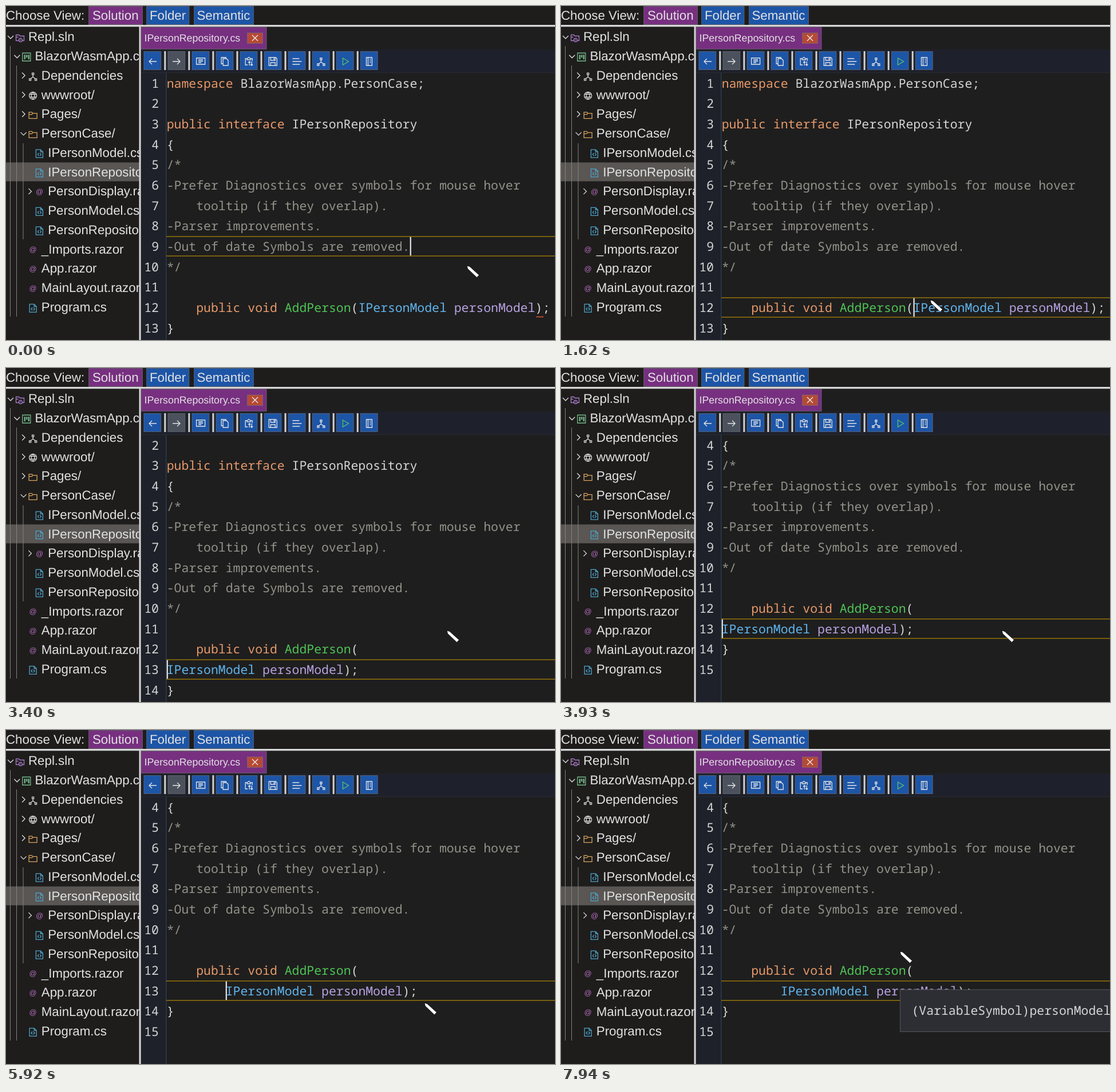
An HTML page that plays this animation: 959 px wide and 584 px high, repeating every 8 s.

```html
<!DOCTYPE html>
<html lang="en">
<head>
<meta charset="utf-8">
<style>
html, body { margin: 0; width: 100%; height: 100%; overflow: hidden; background: #1e1d1c; }
svg { display: block; width: 100%; height: 100%; }
text { font: 22.3px "Liberation Sans", Arial, sans-serif; fill: #e2e2e2; white-space: pre; text-rendering: geometricPrecision; }
.code text { font: 21.46px "Noto Sans Mono", monospace; fill: #d6d6d6; }
.code .num { text-anchor: end; }
.k { fill: #e8996a; }
.c { fill: #93928a; }
.m { fill: #4fc456; }
.t { fill: #60b5ee; }
.p { fill: #b8a2e2; }
.icon { fill: none; stroke-width: 1.3; }
.button { stroke: #777; stroke-opacity: .55; stroke-width: 1.2; }
</style>
</head>
<body>
<svg viewBox="0 0 959 584" preserveAspectRatio="none">
  <clipPath id="side"><path d="M0 36H233V584H0z"/></clipPath>
  <g id="frame"></g>
  <g id="code" class="code"></g>
  <g id="tip" class="code">
    <rect x="592.5" y="454" width="380" height="73.500" fill="#2d2e33" stroke="#55565a"/>
    <text x="612.500" y="498">(VariableSymbol)personModel</text>
  </g>
  <path id="mouse" d="M0 0L5 1.500L21.500 16.500L17.500 20.800L1.500 5.500z" fill="#fff" stroke="#000" stroke-width=".8"/>
</svg>
<script>
const $ = id => document.getElementById(id);
const rect = (x, y, w, h, fill, attr = '') =>
  `<rect x="${x}" y="${y}" width="${w}" height="${h}" fill="${fill}" ${attr}/>`;
const button = (x, y, w, h, fill) => rect(x + .6, y + .6, w - 1.2, h - 1.2, fill, 'class="button"');
const text = (x, y, s, attr = '') => `<text x="${x}" y="${y}" ${attr}>${s}</text>`;
const icon = (x, y, color, d) =>
  `<path class="icon" transform="translate(${x} ${y})" stroke="${color}" d="${d}"/>`;

// Icon outlines, centred on 0,0
const art = {
  down: 'M-5 -2L0 3L5 -2',
  right: 'M-2.500 -5L2.500 0L-2.500 5',
  folder: 'M-7 6V-5H-2L0 -3H7V6zM-7 -1H-2L0 -3',
  root: 'M-2 5H-7V-5H-2L0 -3H7V5H4M-7 -1H-3M-2 4a3 3 0 1 0 6 0a3 3 0 1 0 -6 0M0 4h2',
  project: 'M-7 -7H7V7H-7zM-3.500 -4V4M0 -4V1M3.500 -4V4M-2.500 -4V4M1 -4V1M4.500 -4V4',
  graph: 'M-1.500 -6H1.500V-3H-1.500zM-6.500 4H-3.500V7H-6.500zM3.500 4H6.500V7H3.500zM0 -3V1L-4 4M0 1L4 4',
  globe: 'M-6.500 0a6.500 6.500 0 1 0 13 0a6.500 6.500 0 1 0 -13 0M-6 -2.500H6M-6 2.500H6M0 -6.500Q-6 0 0 6.500Q6 0 0 -6.500',
  file: 'M-6 -7H2L6 -3V7H-6zM2 -7V-3H6M-1 -1L-3 1.500L-1 4M1 -1L3 1.500L1 4',
  left: 'M7 0H-6M-1 -5L-6 0L-1 5',
  forward: 'M-7 0H6M1 -5L6 0L1 5',
  panel: 'M-7.500 -6H7.500V5H-7.500zM-4 -3H4M-4 -.5H4M-4 2H1',
  copy: 'M-3 -5H3L6 -2V7H-3zM-3 4H-6V-7H2V-5',
  paste: 'M-2 6H-6V-5H-3M3 -5H6V-1M-3 -3V-5L0 -7.500L3 -5V-3zM1 7V0M-1 2L1 0L3 2M5 0V7M3 5L5 7L7 5',
  save: 'M-7 -7H5L7 -5V7H-7zM-4 -7V-2H4V-7M-4 7V2H4V7M2 -6V-3',
  lines: 'M-8 -5H4M-8 0H8M-8 5H5',
  play: 'M-4 -6L6 0L-4 6z',
  book: 'M-5 -7H5V7H-5zM-2 -7V7M1 -4H3M1 -1H3M1 2H3'
};

// Tree rows: indent, chevron, icon, colour, label
const tree = [
  [0, 'down', 'root', '#a77bc8', 'Repl.sln'],
  [1, 'down', 'project', '#74b88a', 'BlazorWasmApp.csproj'],
  [2, 'right', 'graph', '#ddd', 'Dependencies'],
  [2, 'right', 'globe', '#ddd', 'wwwroot/'],
  [2, 'right', 'folder', '#d9a35c', 'Pages/'],
  [2, 'down', 'folder', '#d9a35c', 'PersonCase/'],
  [3, '', 'file', '#4ea4cc', 'IPersonModel.cs'],
  [3, '', 'file', '#4ea4cc', 'IPersonRepository.cs'],
  [3, 'right', '@', '#b76ec0', 'PersonDisplay.razor'],
  [3, '', 'file', '#4ea4cc', 'PersonModel.cs'],
  [3, '', 'file', '#4ea4cc', 'PersonRepository.cs'],
  [2, '', '@', '#b76ec0', '_Imports.razor'],
  [2, '', '@', '#b76ec0', 'App.razor'],
  [2, '', '@', '#b76ec0', 'MainLayout.razor'],
  [2, '', 'file', '#4ea4cc', 'Program.cs']
];
const tools = ['left', 'forward', 'panel', 'copy', 'paste', 'save', 'lines', 'graph', 'play', 'book'];
const purple = '#772f80', blue = '#1d55a7';

function drawFrame() {
  let s = button(144, 0, 95, 33, purple) + button(245, 0, 75.5, 33, blue) + button(328, 0, 105, 33, blue);
  s += text(0, 23.7, 'Choose View:') + text(151, 23.7, 'Solution') + text(251, 23.7, 'Folder') + text(333.5, 23.7, 'Semantic');

  s += '<g clip-path="url(#side)">' + rect(0, 273.5, 233, 33, '#595654');
  s += '<path d="M7.500 70V543M18.500 104V543M30 240V408" stroke="#85827f"/>';
  tree.forEach(([depth, chevron, kind, color, label], i) => {
    const y = 54 + i * 33.77, x = 8 + depth * 11.3;
    if (chevron) s += icon(x, y, '#ddd', art[chevron]);
    s += kind === '@'
      ? text(x + 10, y + 5, '@', `style="font-size:13px;fill:${color}"`)
      : icon(x + 16.5, y + 1.5, color, art[kind]);
    s += text(39 + depth * 11.4, y + 7.2, label);
  });
  s += '</g>';

  s += rect(235.5, 36, 724, 548, '#1e1e1e') + rect(235.5, 76, 724, 41, '#1e212b');
  s += rect(235.5, 117, 43.5, 467, '#1e2129') + rect(236, 116, 723, 1, '#272b35') + rect(279, 117, 1.5, 467, '#2a3d50');
  s += rect(0, 33, 959, 3.3, '#d6d6d6') + rect(232.5, 34, 3.1, 550, '#d6d6d6');
  s += button(235.6, 36.3, 220, 39.7, purple) + text(241.5, 62, 'IPersonRepository.cs', 'style="font-size:17.8px"');
  s += button(421, 46.5, 28, 19.5, '#b54a35') + icon(435, 56, '#eee', 'M-5 -5L5 5M5 -5L-5 5');
  tools.forEach((name, i) => {
    const x = 240.3 + i * 42.05;
    s += button(x, 79, 31, 33, i === 1 ? '#4b525d' : blue);
    s += icon(x + 15.7, 97, name === 'play' ? '#58c26a' : '#e4e4e4', art[name]);
    if (i < tools.length - 1) s += rect(x + 36, 79, 3, 33, '#d2d2d2');
  });
  $('frame').innerHTML = s;
}

const span = (cls, s) => `<tspan class="${cls}">${s}</tspan>`;
const head = [
  span('k', 'namespace') + ' BlazorWasmApp.PersonCase;',
  '',
  span('k', 'public interface') + ' IPersonRepository',
  '{',
  ...['/*', '-Prefer Diagnostics over symbols for mouse hover', '    tooltip (if they overlap).',
    '-Parser improvements.', '-Out of date Symbols are removed.', '*/'].map(s => span('c', s)),
  ''
];
const method = '    ' + span('k', 'public void') + ' ' + span('m', 'AddPerson') + '(';
const args = span('t', 'IPersonModel') + ' ' + span('p', 'personModel') + ');';

const left = 280.7, charW = 12.876, lineTop = 117, lineH = 35.67;
const CLICK = 1540, ENTER = 3000;
const scrolls = [3400, 3530, 3930];
const indents = [[4260, 4], [5120, 5], [5460, 6], [5720, 7], [5860, 8]];
const caretTimes = [[0, 640], [1140, 2540], [ENTER, 6860], [7390, 7880]];

function codeAt(t) {
  const split = t >= ENTER;
  const scroll = scrolls.filter(at => t >= at).length;
  const indent = indents.reduce((n, [at, col]) => t >= at ? col : n, 0);
  const rows = [...head, ...(split ? [method, ' '.repeat(indent) + args] : [method + args]), '}', ''];
  const [line, col] = t < CLICK ? [9, 33] : split ? [13, indent] : [12, 26];
  const top = n => lineTop + (n - 1 - scroll) * lineH;

  const y = top(line);
  let s = rect(280, y, 679, 1.5, '#957309') + rect(280, y + 34, 679, 1.5, '#957309');
  rows.forEach((row, i) => {
    if (i < scroll) return;
    const base = (top(i + 1) + 25.5).toFixed(2);
    s += text(267, base, i + 1, 'class="num"') + text(left, base, row);
  });
  if (t < CLICK) s += rect(926, 542.7, 13, 1.6, '#d9502f');
  if (caretTimes.some(([on, off]) => t >= on && t < off))
    s += rect(left + col * charW, y + 1.5, 2.2, 32.5, '#e6e6e6');
  return s;
}

// Pointer path: time, x, y
const path = [
  [0, 805, 454], [60, 805, 454], [280, 871, 464], [450, 840, 500], [700, 720, 537], [860, 653, 531],
  [930, 646, 529], [1070, 632.5, 527], [1200, 615.5, 527], [1560, 615.5, 527], [1880, 770, 459],
  [5660, 770, 459], [5920, 731, 477], [6200, 688, 526], [6520, 640, 472], [6930, 592, 454],
  [7390, 592, 452], [7530, 592, 414], [7660, 592, 414], [7800, 592, 377], [7940, 592, 387], [8000, 592, 387]
];

function pointer(t) {
  const i = path.findIndex(p => p[0] > t);
  const [t0, x0, y0] = path[i - 1], [t1, x1, y1] = path[i];
  const u = (t - t0) / (t1 - t0);
  return `translate(${x0 + (x1 - x0) * u} ${y0 + (y1 - y0) * u})`;
}

let shown = '';
function draw(now) {
  const t = Math.max(0, now - start) % 8000;
  const code = codeAt(t);
  if (code !== shown) $('code').innerHTML = shown = code;
  $('tip').style.display = t >= 7390 ? '' : 'none';
  $('mouse').setAttribute('transform', pointer(t));
  requestAnimationFrame(draw);
}

drawFrame();
const start = performance.now();
draw(start);
</script>
</body>
</html>
```
